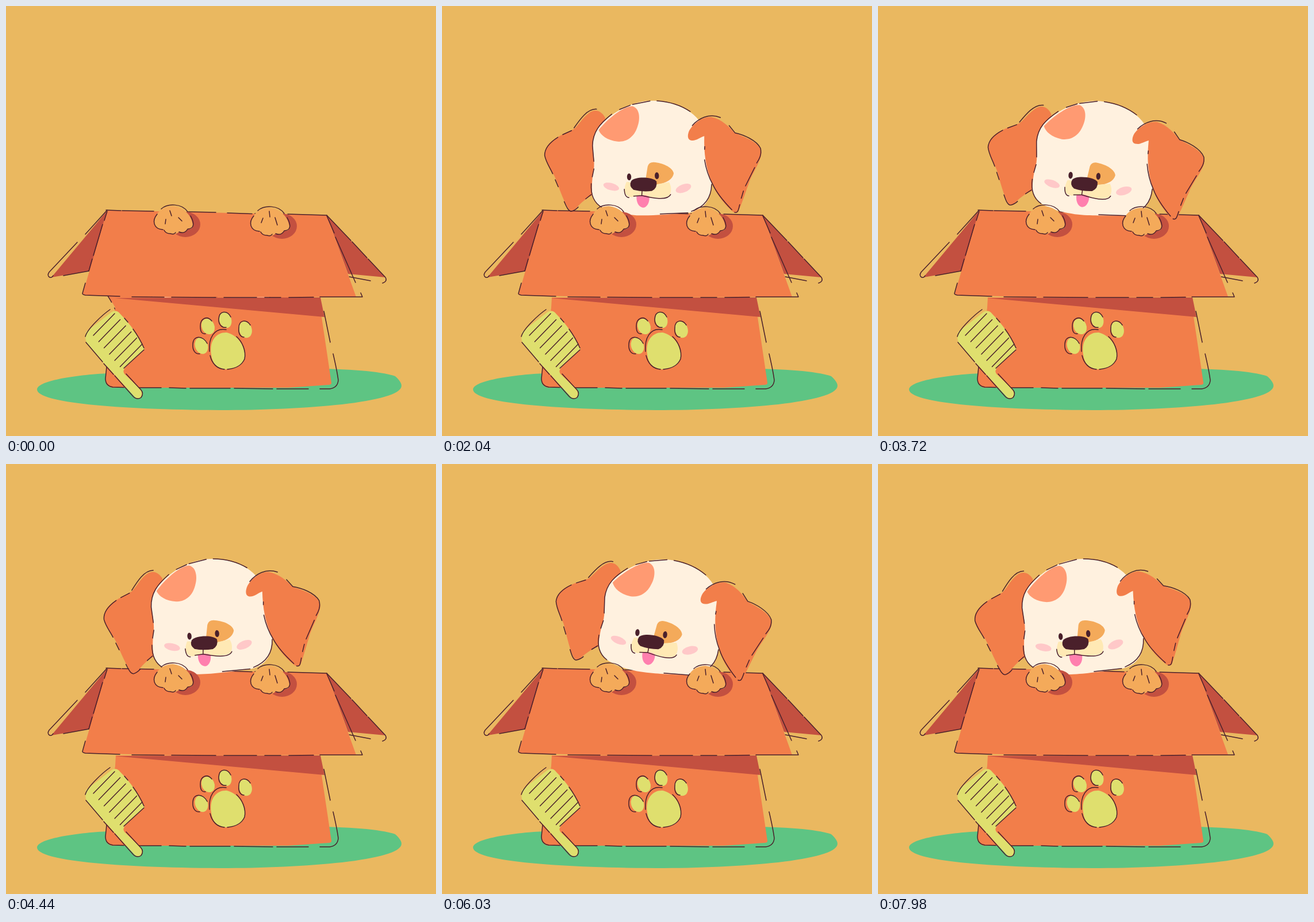
An HTML page with a canvas for the animation above (8.01 s loop, 748 px wide and 748 px high).

```html
<!DOCTYPE html>
<html lang="en">
<head>
<meta charset="utf-8">
<title>Puppy in a box</title>
<style>
html, body { margin: 0; width: 100%; height: 100%; overflow: hidden; background: #eab860; }
canvas { display: block; width: 748px; height: 748px; }
</style>
</head>
<body>
<canvas id="stage" width="748" height="748"></canvas>
<script>
const ctx = document.getElementById('stage').getContext('2d');
const LOOP = 8010, STEP = 30;
const INK = '#4a202b', ORANGE = '#f27e4a', DARK = '#c35040', LIME = '#dfdf6e', TAN = '#f4aa5a';

const cache = {};
const path = d => cache[d] || (cache[d] = new Path2D(d));
function fill(color, d) { ctx.fillStyle = color; ctx.fill(path(d)); }
function line(...parts) {
  ctx.strokeStyle = INK;
  for (const d of parts) ctx.stroke(path(d));
}
function oval(color, x, y, rx, ry, deg = 0) {
  ctx.fillStyle = color;
  ctx.beginPath();
  ctx.ellipse(x, y, rx, ry, deg * Math.PI / 180, 0, 7);
  ctx.fill();
}
const ease = p => (1 - Math.cos(Math.PI * Math.min(1, Math.max(0, p)))) / 2;

// Head tilt: [time, degrees]
const TILT = [[1390, -3], [3050, 10], [4790, -3], [6450, 10], [8220, -3]];
function tiltAt(t) {
  let a = TILT[0][1];
  for (let i = 1; i < TILT.length; i++) {
    const [t0, a0] = TILT[i - 1], [t1, a1] = TILT[i];
    if (t >= t0) a = a0 + (a1 - a0) * ease((t - t0) / (t1 - t0));
  }
  return a;
}

function ground() {
  ctx.fillStyle = '#eab860';
  ctx.fillRect(0, 0, 748, 748);
  fill('#5ec483', 'M54 667C54 654 106 643 176 639L520 631C600 630 660 637 677 644C684 650 688 656 688 661C686 690 520 703 372 703C190 702 54 690 54 667Z');
}

function sideFlaps() {
  fill(DARK, 'M176 356L79 472L150 460ZM558 364L660 472L595 466Z');
  line('M176 355L138 397M124 411L75 463Q71 469 76 472Q80 473 82 469M100 469L144 461',
    'M558 364L600 408M602 410L628 438M630 440L660 472Q664 479 655 482M597 471L634 478');
}

function boxBody() {
  fill(ORANGE, 'M191 507L547 507L549 541L566 655Q567 658 562 659L490 664L184 664Q173 661 173 650L175 628L190 525Z');
  fill(DARK, 'M190 508L547 507L554 541Z');
  line('M175 628L173 648Q173 661 186 663L205 663.5M212 664L270 664M284 664L313 665M320 665L390 665M397 665L464 666M471 666L526 666',
    'M546 666L563 666Q577 664 578 651Q576 635 569 605M564 585L553 531');
}

function comb() {
  fill(LIME, 'M139 567L183 533Q192 527 199 536C215 552 232 575 241 597L208 628Q202 635 206 640L234 667Q240 672 236 680Q230 685 224 680L142 590Q136 580 139 567Z');
  line('M138 575C141 562 168 537 181 528M139 585L168 619M170 622L187 641M189 643L221 679Q228 686 235 681Q240 674 235 668L209 640',
    'M206 543L212 550M221 562Q232 577 240 595M240 598L205 630');
  for (let i = 0; i < 6; i++)
    line(`M${152 + 9.3 * i} ${573 + 10.9 * i}L${189 + 9.6 * i} ${535 + 10.6 * i}`);
}

function print() {
  fill(LIME, 'M357 606C353 580 368 567 384 568C402 572 415 590 416 607C416 625 398 632 381 632C366 630 359 622 357 606Z');
  line('M383 563C362 559 352 578 354 601M355 608C359 624 369 631 380 632M385 632C397 631 410 626 415 614C418 600 411 584 401 575');
  oval(LIME, 340, 591, 11, 14.5, -20);
  oval(LIME, 351.5, 557.5, 11, 14, -25);
  oval(LIME, 381.5, 546, 10.5, 14.5, -18);
  oval(LIME, 416.5, 563, 11, 14.5, -18);
  line('M350 587C343 573 326 572 325 588C324 600 330 606 337 605', 'M358 548C350 538 338 543 338 557C338 567 341 571 347 570',
    'M391 541C385 529 371 529 370 545C370 555 376 560 383 559', 'M425 555C418 544 405 546 405 560C404 570 408 576 414 576');
}

function frontFlap() {
  fill(ORANGE, 'M176 355L558 364L609 506L300 507L138 503Q133 502 134 499Z');
  line('M174 355L200 356M202 356L257 357M317 358L365 359M385 360L428 361.5M433 361L440 361.5M490 362L558 364',
    'M176 357L171 373M168 380L152 434M150 440L144 461M138 482L133 500Q133 502 138 503L198 505M219 506L275 506.5M288 506.5L365 507M379 507L436 507M450 507L478 507M492 507L535 506.5M546 506L620 506L617 499',
    'M558 365L571 395M573 402L608 481');
}

function paw(x, y, toes) {
  ctx.save();
  ctx.translate(x, y);
  oval(DARK, 312, 380, 26, 22);
  fill(TAN, 'M258 378C257 362 272 348 290 348C308 350 322 362 325 380Q326 389 316 388Q311 397 301 393Q294 399 286 396Q278 396 275 389C266 389 259 386 258 378Z');
  line('M270 353C281 343 306 343 316 358M321 365C328 378 328 387 316 388Q311 397 301 393M295 394Q293 398 286 396Q278 396 275 390M273 389C257 388 253 374 263 362');
  ctx.restore();
  line(toes);
}

function ears(left) {
  if (left) {
    fill(ORANGE, 'M270 200C262 187 250 185 240 195C229 205 224 217 217 223C200 233 168 246 169 270C172 288 186 300 191 312C199 330 208 352 218 364Q224 367 229 361C238 349 248 340 256 336L264 270Z');
    line('M217 221C226 206 238 186 254 186M213 226L198 234M190 239C176 249 168 260 169 272C172 284 180 293 185 303M190 313L196 325M208 350C213 360 217 367 222 366Q228 364 233 358M245 343L254 335');
    return;
  }
  fill(ORANGE, 'M417 214C422 202 438 187 454 187C473 190 486 202 496 212C515 219 543 226 545 244C545 260 531 280 526 300C520 320 515 340 511 349Q507 353 502 349C492 342 470 321 462 300C450 277 445 250 444 221C436 224 431 230 423 230C414 230 415 220 417 214Z');
  line('M422 204C432 191 450 180 470 187M486 200L497 212C511 214 535 222 543 236C546 247 542 255 538 262M535 270L521 303M518 312L515 325M513 336C511 349 510 351 505 350',
    'M446 239L446 244M447 262C451 280 457 293 464 304C470 315 480 328 500 346');
}

function face() {
  fill(TAN, 'M349 280Q351 271 362 272C378 273 393 280 395 289C394 301 380 309 362 311L347 302Z');
  fill('#ffe9b4', 'M314 309C308 325 313 335 325 335L342 330C360 334 380 335 390 328C394 320 392 311 388 305L366 310Z');
  fill('#ff7fae', 'M333 333Q345 328 355 332C357 342 352 352 345 352C337 351 333 342 333 333Z');
  line('M342 322L342 331M311 322C312 332 315 336 320 336M328 333L342 331C360 334 387 338 392 326');
  fill(INK, 'M322 307C328 298 360 297 366 305Q369 316 359 322Q342 325 327 322Q318 316 322 307Z');
  oval(INK, 318, 300, 3.7, 6, -5);
  oval(INK, 366, 295, 3.7, 6, -5);
  oval('#ffc8c8', 288, 319, 14, 6.3, 12);
  oval('#ffc8c8', 413.5, 314, 14, 7, -24);
}

function dog(t) {
  const drop = 210 * (1 - ease((t - 930) / 395));
  ctx.save();
  ctx.translate(366, 418 + drop);
  ctx.rotate((tiltAt(t) + 2.28) * Math.PI / 180);
  ctx.translate(-366, -418);
  ears(true);
  fill('#fff1df', 'M251 243C252 231 256 221 262 214C285 186 320 165 358 165C400 166 440 183 452 230L462 300C464 330 452 352 420 357C385 361 365 365 335 366C300 366 268 360 258 341C253 328 254 303 256 287C256 270 251 258 251 243Z');
  fill('#ff9a72', 'M260 222C274 202 300 178 316 177C330 180 331 200 327 212C322 232 308 240 294 240C276 239 264 231 260 222Z');
  line('M281 193C261 211 250 226 251 250L255 277M256 290L254 304M253 316C253 336 260 349 274 356M294 184L312 175.5M316 174L346 166M358 165C380 165 400 170 417 180M376 361L424 356M430 353C452 344 463 327 462 304');
  face();
  ears(false);
  ctx.restore();
}

function draw(t) {
  const out = t >= 1320;
  ctx.lineWidth = 1.5;
  ctx.lineCap = ctx.lineJoin = 'round';
  ground();
  if (!out) dog(t);
  sideFlaps();
  boxBody();
  comb();
  print();
  frontFlap();
  if (out) dog(t);
  paw(0, 0, 'M285 356L288 365M300 368L306 374M278 371L277 379');
  paw(168, 3, 'M458 357L459 367M468 368L472 381M447 369L444 377');
}

const start = performance.now();
function tick() {
  const t = (performance.now() - start) % LOOP;
  draw(Math.floor(t / STEP) * STEP);
  requestAnimationFrame(tick);
}
tick();
</script>
</body>
</html>
```
